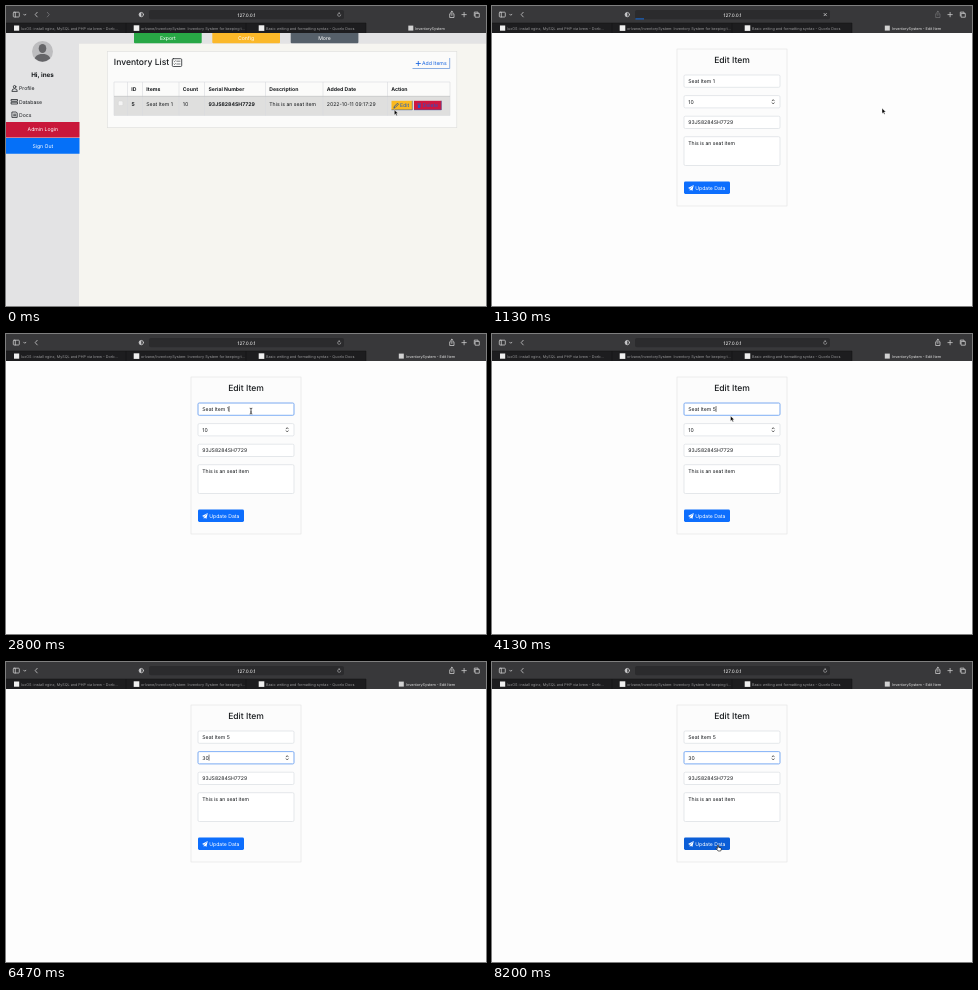
An HTML page for the animation above (8470 ms loop, 480 by 300 pixels).

```html
<!DOCTYPE html>
<html lang="en">
<head>
<meta charset="utf-8">
<title>Inventory</title>
<style>
  html, body { margin: 0; height: 100%; overflow: hidden; background: #fdfdfd; }
  svg { display: block; width: 100vw; height: 100vh; }
  text { font: 5.15px Inter, "Liberation Sans", sans-serif; fill: #15181b; white-space: pre; text-rendering: geometricPrecision; }
  .mid { text-anchor: middle; }
  .b text, text.b { font-weight: 700; }
  .w text, text.w { fill: #fff; }
  .tabs text { font-size: 3.75px; fill: #98989a; }
  .tabs text.on { fill: #e4e4e4; }
  text.h { font-size: 8.55px; font-weight: 550; }
  .line { fill: none; stroke-width: .8; stroke-linecap: round; stroke-linejoin: round; }
  .field { fill: #fff; stroke: #d3d8dd; stroke-width: .6; }
  .ring { fill: none; stroke: #86b4fa; }
</style>
</head>
<body>
<svg viewBox="0 0 480 300">
  <g id="list">
    <path fill="#f6f5f0" d="M0 27H480V300H0z"/>
    <path fill="#e3e3e4" d="M0 27H480V37.700H73V300H0z"/>
    <circle cx="36.500" cy="45.500" r="10.500" fill="#bdbdbf"/>
    <ellipse cx="36.500" cy="42.500" rx="3.800" ry="4.600" fill="#656568"/>
    <path fill="#656568" d="M28.800 52.500q.5-3.500 5.700-4.500h4q5.200 1 5.700 4.500-7.700 6.500-15.400 0z"/>
    <text class="mid b" x="36.500" y="71" style="font-size:6.300px">Hi, ines</text>
    <g class="line" stroke="#212529" stroke-width=".6">
      <circle cx="8.600" cy="80.800" r="1.300"/><path d="M5.900 85q0-2.300 2.700-2.300t2.700 2.300z"/>
      <path d="M5.500 93.500H11.500V95.200H5.500zM5.500 96.200H11.500V98H5.500z"/>
      <path d="M6.300 106H10.200L11.200 107V111.400H6.300zM7.600 108.200H9.800M7.600 109.700H9.800"/>
    </g>
    <text x="13" y="84">Profile</text>
    <text x="13" y="97.500">Database</text>
    <text x="13" y="110.700">Docs</text>
    <path fill="#c9173a" d="M0 116H73.500V131.500H0z"/>
    <path fill="#0570f8" d="M0 132H73.500V147.700H0z"/>
    <rect x="128" y="25" width="67.700" height="12.300" rx="1" fill="#28a745"/>
    <rect x="206.300" y="25" width="67.700" height="12.300" rx="1" fill="#fbb829"/>
    <rect x="284.700" y="25" width="67.700" height="12.300" rx="1" fill="#56606a"/>
    <g class="mid w">
      <text x="36.800" y="125.400">Admin Login</text>
      <text x="36.800" y="141.600">Sign Out</text>
      <text x="161.800" y="34">Export</text>
      <text x="240" y="34">Config</text>
      <text x="318.500" y="34">More</text>
    </g>
    <rect x="101.300" y="45.300" width="349.500" height="76.400" fill="#fbfbfa" stroke="#dededc" stroke-width=".6"/>
    <text class="h" x="107.800" y="59">Inventory List</text>
    <g class="line" stroke="#212529">
      <rect x="166.300" y="52.700" width="9.400" height="7.800" rx="1"/>
      <path d="M170.800 55.200H174M170.800 58H174M168 55.200l.5.5.9-1M168 58l.5.5.9-1" stroke-width=".6"/>
    </g>
    <path fill="none" stroke="#5b8fd8" stroke-width=".7" d="M406.500 62.500H443.700V52"/>
    <path class="line" stroke="#0d5fe0" d="M410.200 57.500H414.400M412.300 55.400V59.600"/>
    <text x="416" y="59.400" style="fill:#0d5fe0">Add Items</text>
    <path fill="#dfdfde" d="M108 90.300H444V109.400H108z"/>
    <path fill="none" stroke="#d9dbdd" stroke-width=".6" d="M108 76H444V109.400H108zM121.500 76V109.400M136.500 76V109.400M173 76V109.400M198.500 76V109.400M259.500 76V109.400M317 76V109.400M381.500 76V109.400"/>
    <path stroke="#bfc1c3" stroke-width=".7" d="M108 90.300H444"/>
    <g class="b">
      <text x="125.300" y="84.900">ID</text>
      <text x="140.300" y="84.900">Items</text>
      <text x="176.800" y="84.900">Count</text>
      <text x="202.500" y="84.900">Serial Number</text>
      <text x="263.300" y="84.900">Description</text>
      <text x="320.800" y="84.900">Added Date</text>
      <text x="385.200" y="84.900">Action</text>
      <text x="125.500" y="99.700">5</text>
      <text x="202.500" y="99.700">93JS8284SH7729</text>
    </g>
    <rect x="112.300" y="95" width="4.600" height="4.600" rx="1" fill="#f4f4f4" stroke="#d0d0d0" stroke-width=".4"/>
    <text x="140.300" y="99.700">Seat Item 1</text>
    <text x="176.800" y="99.700">10</text>
    <text x="263.300" y="99.700">This is an seat item</text>
    <text x="320.800" y="99.700">2022-10-11 09:17:29</text>
    <rect id="edit" x="385.500" y="94.800" width="21" height="9.200"/>
    <rect x="408" y="94.800" width="27.500" height="9.200" fill="#cf1640"/>
    <path fill="none" stroke="#3f63a8" stroke-width=".6" d="M385.500 103.800H406.300V94.800M408 103.800H435.300V94.800"/>
    <path class="line" stroke="#1f4f9c" d="M388 101.800l.5-1.600 3-3 1 1-3 3z"/>
    <path fill="#2456c8" d="M411.300 97.600H415V98.300H411.300zM411.700 98.700H414.600L414.300 102H412z"/>
    <text x="394" y="101.300" style="fill:#1c5bc4">Edit</text>
    <text x="416.500" y="101.300" style="fill:#2456c8">Delete</text>
  </g>

  <g id="form">
    <rect x="185" y="43" width="110" height="157" fill="#fcfcfc" stroke="#e2e2e2" stroke-width=".6"/>
    <text class="h mid" x="240" y="57.300">Edit Item</text>
    <rect class="field" x="192" y="69" width="96" height="12.300" rx="1.300"/>
    <rect class="field" x="192" y="89.600" width="96" height="12.300" rx="1.300"/>
    <rect class="field" x="192" y="110.200" width="96" height="12.300" rx="1.300"/>
    <rect class="field" x="192" y="130.700" width="96" height="28.800" rx="1.300"/>
    <rect class="ring" x="192" y="69" width="96" height="12.300" rx="1.300"/>
    <rect class="ring" x="192" y="89.600" width="96" height="12.300" rx="1.300"/>
    <path class="line" stroke="#444" stroke-width=".6" d="M280.200 94.800l1-1.200 1 1.200M280.200 96.800l1 1.200 1-1.200"/>
    <text id="name" x="196.300" y="77"></text>
    <text id="count" x="196.300" y="97.700"></text>
    <text x="196.300" y="118.300">93JS8284SH7729</text>
    <text x="196.300" y="139">This is an seat item</text>
    <path id="caret" d="M0 0V6" stroke="#222" stroke-width=".6"/>
    <rect id="update" x="192" y="175.500" width="46" height="12.500" rx="1.400"/>
    <path fill="#fff" d="M196 181.900L201.800 179 200.300 185 198.900 183.600 197.800 184.900V182.800z"/>
    <path stroke="#0d6efd" stroke-width=".4" d="M198 183L201 179.800"/>
    <text class="w" x="203.200" y="183.800">Update Data</text>
  </g>

  <g id="browser">
    <path fill="#38383a" d="M0 0H480V27H0z"/>
    <path fill="#1d1d1f" d="M0 17H360V27H0z"/>
    <path stroke="#111" stroke-width=".5" d="M0 17H360M120 17V27M240 17V27M360 17V27"/>
    <rect x="143" y="4" width="195" height="9.300" rx="1.800" fill="#2b2b2d"/>
    <text class="mid w" x="240.500" y="10.500" style="font-size:4.700px">127.0.0.1</text>
    <path id="bar" stroke="#1677f2" stroke-width=".9"/>
    <g class="line" stroke="#c9c9cb" stroke-width=".6">
      <rect x="7.300" y="6.200" width="6" height="4.800" rx=".8"/>
      <path d="M9.300 6.300V11M17.700 8.200l1.100 1.100 1.100-1.100M31.200 6.300L29.200 8.600 31.200 10.900"/>
      <path id="forward" stroke="#77777a" d="M41.300 6.300L43.300 8.600 41.300 10.900"/>
      <path id="share" d="M444.600 7.800H443.700V11.500H448V7.800H447.100M445.850 9.500V5.300M444.700 6.300L445.850 5.200 447 6.300"/>
      <path d="M455.900 8.600H460.300M458.100 6.400V10.800"/>
      <path d="M468.300 9.900V6.100H472V7.300M469.500 7.400H473.300V11.200H469.500z"/>
      <circle cx="135.300" cy="8.600" r="2.200"/>
      <path id="reload" stroke-width=".5" d="M333.500 7.200A1.600 1.600 0 1 0 334.800 8.800M333 6.400l.8.800-.8.800"/>
      <path id="stop" d="M332 7.400l2.400 2.400M334.400 7.400l-2.400 2.400"/>
    </g>
    <path fill="#c9c9cb" d="M135.300 6.400a2.200 2.200 0 0 0 0 4.400z"/>
    <g class="tabs">
      <g fill="#efefef">
        <rect x="8" y="19.500" width="5.200" height="5.200"/>
        <rect x="127.700" y="19.300" width="5.600" height="5.600"/>
        <rect x="252.700" y="19.300" width="5.600" height="5.600"/>
      </g>
      <text x="15" y="23.500">luxOS: install nginx, MySQL and PHP via brew - Dorb…</text>
      <text x="135" y="23.500">orlvane/InventorySystem: Inventory System for keeping t…</text>
      <text x="260" y="23.500">Basic writing and formatting syntax - Quorlo Docs</text>
      <rect id="icon" y="19.600" width="5" height="5" fill="#d2d2d2"/>
      <text id="tab" class="on" y="23.500"></text>
    </g>
  </g>

  <g id="pointer">
    <path fill="#000" stroke="#fff" stroke-width=".45" d="M0 0V5.200L1.300 4.100 2.200 6 3.100 5.600 2.200 3.700H3.800z"/>
    <path fill="#fff" stroke="#000" stroke-width=".6" d="M-.6 3V.4Q0-.5.6.4V2.300L3 2.900Q3.500 3.200 3.300 4.300L2.700 6H.1L-1.800 3.600Q-1.700 2.500-.6 3.400z"/>
    <path fill="none" stroke="#111" stroke-width=".7" d="M-1.300-2.800Q0-2.800 0-2 0-2.800 1.300-2.800M0-2V2.200M-1.300 3Q0 3 0 2.200 0 3 1.300 3M-.7 1H.7"/>
  </g>
</svg>
<script>
const $ = id => document.getElementById(id);
const show = (el, on) => { el.style.display = on ? "" : "none"; };
const set = (el, attrs) => { for (const k in attrs) el.setAttribute(k, attrs[k]); };
const clamp = v => Math.max(0, Math.min(1, v));
const between = (n, a, b) => n >= a && n < b;
// last value whose start tick has been reached
const pick = (n, list) => list.filter(([start]) => n >= start).pop()[1];

const LOOP = 8470, RATE = 15;               // ms, ticks per second
const PAGE = 17, LOADED = 25;               // ticks
const FOCUS = [38, 67];
const path = [[0, 388.3, 103.8], [2, 390, 103.3], [17, 390, 102.3], [18, 390, 102.3], [25, 296, 103.5],
  [29, 296, 103.5], [38, 245, 77], [60, 245, 77], [66, 220, 96], [110, 220, 96], [121, 226, 183]];
const names = [[0, "Seat Item 1"], [47, "Seat Item "], [54, "Seat Item 5"]];
const counts = [[0, "10"], [75, "1"], [85, ""], [95, "3"], [97, "30"]];
const rings = document.querySelectorAll(".ring");

function pointerAt(n) {
  const i = path.findIndex(([start]) => start > n);
  if (i < 0) return path[path.length - 1].slice(1);
  const [t0, x0, y0] = path[i - 1], [t1, x1, y1] = path[i];
  const p = (n - t0) / (t1 - t0), e = p * p * (3 - 2 * p);
  return [x0 + (x1 - x0) * e, y0 + (y1 - y0) * e];
}

function draw(n) {
  const form = n >= PAGE, loading = between(n, 16, LOADED);
  show($("list"), !form);
  show($("form"), form);
  show($("reload"), !loading);
  show($("stop"), loading);
  show($("forward"), !form);
  set($("share"), { opacity: form && loading ? .35 : 1 });
  set($("icon"), { x: form ? 392.8 : 402.3 });
  set($("tab"), { x: form ? 400 : 409 });
  $("tab").textContent = form ? "InventorySystem - Edit Item" : "InventorySystem";
  const load = clamp((n - PAGE) / 6);
  set($("bar"), { d: `M143.5 12.9h${8.5 + 185 * load * load}`, opacity: form ? clamp(LOADED - n) : 0 });

  const [x, y] = pointerAt(n);
  const hover = y > 175.5;
  const inField = form && between(x, 192, 288) && (between(y, 69, 81.3) || between(y, 89.6, 122.5) || between(y, 130.7, 159.5));
  const shape = inField ? 2 : hover || between(n, 2, PAGE) ? 1 : 0;
  set($("pointer"), { transform: `translate(${x} ${y})` });
  [...$("pointer").children].forEach((el, i) => show(el, i === shape));
  show($("pointer"), !between(n, 47, 60) && !between(n, 74, 110));
  set($("edit"), { fill: n < 2 ? "#fbb91f" : "#d09a16" });
  set($("update"), { fill: hover ? "#0b5ed7" : "#0d6efd" });

  $("name").textContent = pick(n, names);
  $("count").textContent = pick(n, counts);
  const grow = FOCUS.map(f => clamp((n - f + 1) / 3));
  set(rings[0], { opacity: grow[0] - grow[1] });
  set(rings[1], { opacity: grow[1] });
  const second = n >= FOCUS[1], box = $(second ? "count" : "name");
  const width = form && box.textContent ? box.getComputedTextLength() : 0;
  set($("caret"), { transform: `translate(${196.6 + width} ${second ? 92.7 : 72})` });
  show($("caret"), n >= FOCUS[0] && !between(n, 92, 95) && !between(n, 104, 110) && n < 118);
}

function frame(now) {
  draw(Math.floor((now % LOOP + 4) * RATE / 1000));
  requestAnimationFrame(frame);
}
frame(performance.now());
</script>
</body>
</html>
```
